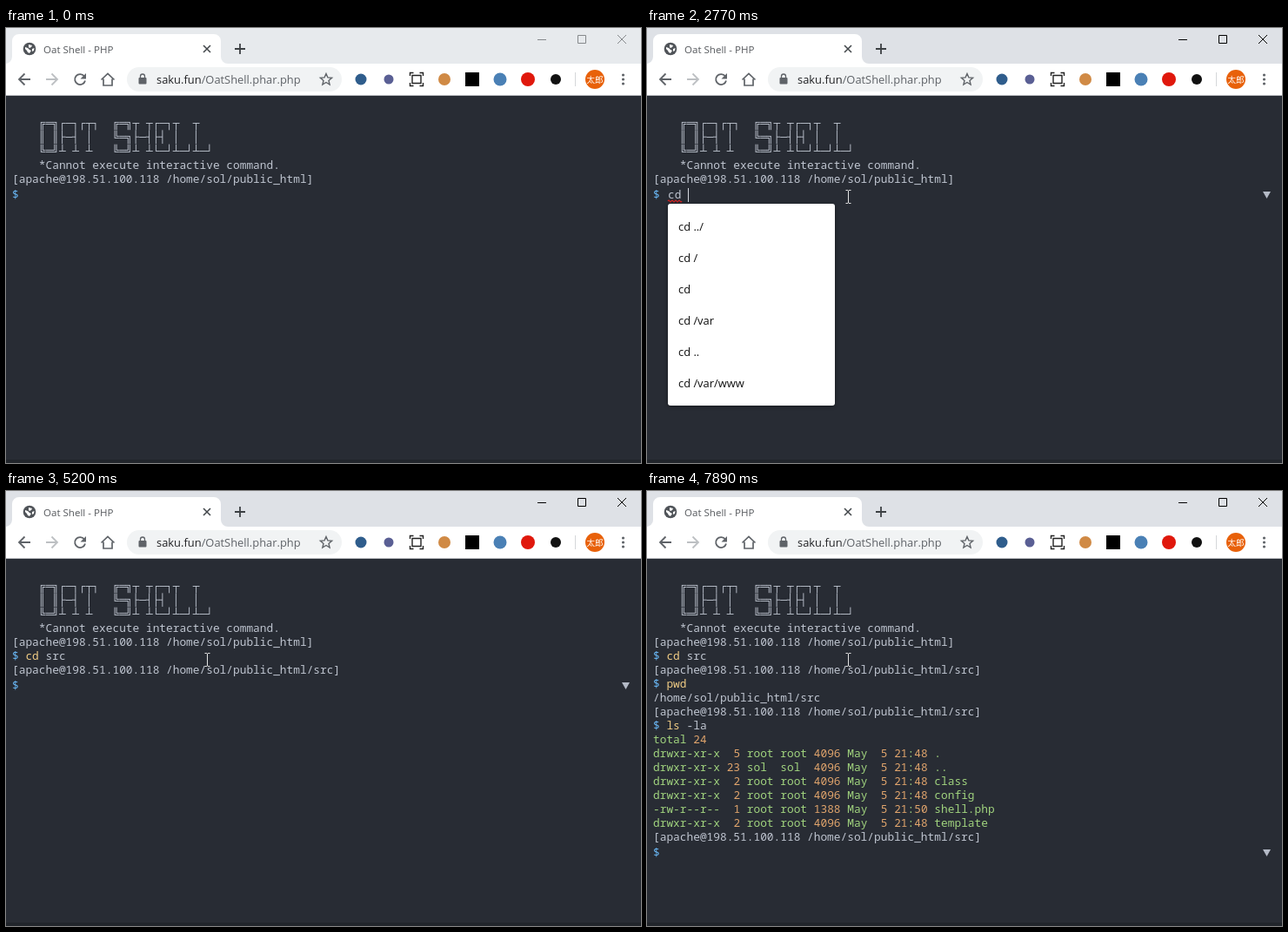
Animation, 730 px wide and 500 px high, one loop 8000 ms. Source, as an HTML page:

```html
<!DOCTYPE html>
<html lang="en">
<head>
<meta charset="utf-8">
<title>Oat Shell - PHP</title>
<style>
html, body { margin: 0; width: 100%; height: 100%; overflow: hidden; background: #282c34; }
svg { display: block; }
text { white-space: pre; }
.mono { font: 500 12.83px "Noto Sans Mono", "DejaVu Sans Mono", monospace; fill: #bfc5d0; }
.ui { font-family: "Open Sans", "Noto Sans", sans-serif; }
.item { font-size: 12.9px; fill: #111; }
.sub { font-size: 11.6px; fill: #757575; }
.line { fill: none; stroke: #5f6368; stroke-width: 1.8; }
.menu { filter: drop-shadow(0 1px 2px rgba(0, 0, 0, .4)); }
</style>
</head>
<body>
<svg width="730" height="500" viewBox="0 0 730 500">
  <defs><clipPath id="menuClip"><rect x="36" y="78" width="432" height="422"/></clipPath></defs>

  <rect id="strip" width="730" height="42"/>
  <path d="M-1 41a8 8 0 0 0 8-8V15a8 8 0 0 1 8-8H239a8 8 0 0 1 8 8V33a8 8 0 0 0 8 8Z" fill="#fff"/>
  <g id="favicon">
    <circle cx="27" cy="24" r="7.3" fill="#505459"/>
    <path d="M22 22l3 1 2 2 2 1-2 3-2-1-1-2-2-2ZM26 19l4 1-1 2-2 1-1-1ZM30 24l2.500-1-.5 3-2 1Z" fill="#fff"/>
  </g>
  <path id="spinner" d="M27 17.5a6.5 6.5 0 0 1 5.6 9.8" fill="none" stroke="#4285f4" stroke-width="2"/>
  <text class="ui" x="43" y="28.5" font-size="11.55" fill="#55585c">Oat Shell - PHP</text>
  <path d="M227 20l8 8m0-8l-8 8" class="line" style="stroke:#45494d;stroke-width:1.6"/>
  <path d="M263 24h12m-6-6v12" class="line" style="stroke:#3c4043"/>
  <path id="controls" d="M611 13.5h10M657.5 8.5h9v9h-9ZM703 8l10 10m0-10l-10 10" fill="none"/>

  <rect y="41" width="730" height="36" fill="#fff"/>
  <rect y="77" width="730" height="1" fill="#b8babf"/>
  <path d="M28 59H15m6.5-6.5L15 59l6.5 6.5" class="line"/>
  <path d="M46 59H59m-6.5-6.5L59 59l-6.5 6.5" class="line" style="stroke:#bdc0c3"/>
  <g id="reload">
    <path d="M90 55.5a6 6 0 1 0 1 5" class="line"/>
    <path d="M92 52v6.5h-6.5Z" fill="#5f6368"/>
  </g>
  <path id="stop" d="M80 54l10 10m0-10L80 64" class="line"/>
  <path d="M109.5 59.5L117 52.5l7.5 7M112 58.5V66h10V58.5" class="line" style="stroke-width:1.7"/>
  <rect x="139" y="45" width="247" height="28" rx="14" fill="#f1f3f4"/>
  <rect x="152.5" y="57" width="9" height="7.5" rx="1" fill="#5f6368"/>
  <path d="M154.5 57v-1.5a2.5 2.5 0 0 1 5 0V57" class="line" style="stroke-width:1.3"/>
  <text class="ui" x="173" y="64" font-size="12.9" fill="#5f6368"><tspan fill="#202124">saku.fun</tspan>/OatShell.phar.php</text>
  <path d="M368 52.5l1.9 4.4 4.7.4-3.6 3.1 1.1 4.6-4.1-2.5-4.1 2.5 1.1-4.6-3.6-3.1 4.7-.4Z" class="line" style="stroke-width:1.4"/>

  <circle cx="408" cy="59" r="6.5" fill="#2f5d8c"/>
  <circle cx="440" cy="59" r="5.5" fill="#5a5f94"/>
  <path d="M467 54.5h10v9h-10ZM464.5 55v-3.5h4M475.5 51.5h4V55M464.5 63v3.5h4M475.5 66.5h4V63" class="line" style="stroke:#222;stroke-width:1.4"/>
  <circle cx="504" cy="59" r="7" fill="#d08a45"/>
  <rect x="528" y="51" width="16" height="16" fill="#000"/>
  <circle cx="568" cy="59" r="7.5" fill="#4a80b5"/>
  <circle cx="600" cy="59" r="8" fill="#e0180c"/>
  <circle cx="632" cy="59" r="6" fill="#111"/>
  <path d="M654.5 51v16" stroke="#d5d7da"/>
  <circle cx="677" cy="59" r="11" fill="#e8610a"/>
  <text x="677" y="62.5" font-size="9.5" text-anchor="middle" fill="#fff" style="font-family:'Noto Sans CJK JP','Noto Sans CJK',sans-serif">太郎</text>
  <g fill="#5f6368"><circle cx="709.5" cy="54" r="1.6"/><circle cx="709.5" cy="59" r="1.6"/><circle cx="709.5" cy="64" r="1.6"/></g>

  <rect y="78" width="730" height="422" fill="#282c34"/>
  <rect y="496" width="730" height="4" fill="#21252b"/>
  <g id="terminal"></g>
  <g id="status" class="ui">
    <path d="M0 478H237a4 4 0 0 1 4 4V500H0Z" fill="#dee1e6"/>
    <text x="6" y="493" font-size="11.6" fill="#5f6368">Waiting for saku.fun...</text>
  </g>
  <path id="beam" d="M-3 -7.5h2.3l.7.7.7-.7H3M-3 7.5h2.3l.7-.7.7.7H3M0 -7V7" fill="none" stroke="#e4e4e4"/>
  <path id="arrow" d="M.5 .5V16.5l3.7-3.5 2.5 5.5 2.3-1-2.4-5.5H11.5Z" fill="#fff" stroke="#111" stroke-width=".9"/>
</svg>
<script>
const LOOP = 8000;
const COLUMN = 7.698;
const $ = id => document.getElementById(id);

const path = '/home/sol/public_html';
const promptLine = dir => `[apache@198.51.100.118 ${dir}]`;
const banner = [
  '    ╔═╗┌─┐┌┬┐  ╔═╗┬ ┬┌─┐┬  ┬',
  '    ║ ║├─┤ │   ╚═╗├─┤├┤ │  │',
  '    ╚═╝┴ ┴ ┴   ╚═╝┴ ┴└─┘┴─┘┴─┘',
  '    *Cannot execute interactive command.',
  promptLine(path)
];
const afterCd = [...banner, '$ cd src', promptLine(path + '/src')];
const afterPwd = [...afterCd, '$ pwd', path + '/src', promptLine(path + '/src')];
const entry = (links, owner, name) =>
  `drwxr-xr-x ${links} ${owner} ${owner} 4096 May  5 21:48 ${name}`;
const afterLs = [
  ...afterPwd, '$ ls -la', 'total 24',
  entry(' 5', 'root', '.'),
  entry('23', 'sol ', '..'),
  entry(' 2', 'root', 'class'),
  entry(' 2', 'root', 'config'),
  '-rw-r--r--  1 root root 1388 May  5 21:50 shell.php',
  entry(' 2', 'root', 'template'),
  promptLine(path + '/src')
];

const wide = (...items) => ({ dump: true, items });
const narrow = (...items) => ({ items });
const pwdMenu = narrow('pwd', 'pwd | ls -la', 'pwd; ls -la');

// Each step overrides part of the state from its time onwards.
const steps = [
  [0, { page: banner, typed: '', caret: false, menu: null, hover: false, active: false, loading: false, pointer: 'none' }],
  [130, { pointer: 'arrow' }],
  [830, { pointer: 'beam', hover: true }],
  [1230, { active: true }],
  [1300, { caret: true, menu: wide('ls -la', 'ls', 'pwd', 'cd ../', 'clear', 'cd /') }],
  [1780, { caret: false }],
  [2240, { typed: 'c', caret: true, menu: wide('cd ../', 'clear', 'cd /', 'cd', 'cd /var', 'cd ..') }],
  [2540, { typed: 'cd' }],
  [2620, { menu: narrow('cd ../', 'cd /', 'cd', 'cd /var', 'cd ..', 'cd /var/www') }],
  [2770, { typed: 'cd ' }],
  [2850, { menu: narrow('cd ../', 'cd /', 'cd /var', 'cd ..', 'cd /var/www', 'cd /home') }],
  [3320, { caret: false }],
  [3570, { typed: 'cd s', caret: true }],
  [3640, { menu: null }],
  [3790, { typed: 'cd sr' }],
  [3960, { typed: 'cd src' }],
  [4270, { loading: true }],
  [4460, { caret: false }],
  [4650, { page: afterCd, typed: '', caret: true }],
  [4730, { loading: false }],
  [5200, { caret: false }],
  [5730, { typed: 'p', caret: true, menu: wide('pwd', 'pwd | ls -la', 'pwd; ls -la', 'php -v', 'ps aux') }],
  [5810, { typed: 'pw', menu: pwdMenu }],
  [5890, { typed: 'pwd' }],
  [6040, { menu: null, loading: true }],
  [6270, { page: afterPwd, typed: '', pointer: 'arrow' }],
  [6350, { loading: false }],
  [6730, { typed: 'l' }],
  [6810, { pointer: 'beam', menu: narrow('ls -la', 'ls', 'ls ../') }],
  [6980, { typed: 'ls' }],
  [7050, { typed: 'ls ', menu: narrow('ls -la', 'ls ../') }],
  [7120, { typed: 'ls -', menu: narrow('ls -la') }],
  [7280, { typed: 'ls -l' }],
  [7360, { typed: 'ls -la', menu: null }],
  [7510, { page: afterLs, typed: '' }],
  [7890, { caret: false }]
];

const stateAt = t => Object.assign({}, ...steps.filter(([time]) => time <= t).map(([, s]) => s));
const text = (x, y, cls, body) => `<text x="${x}" y="${y}" class="${cls}">${body}</text>`;
const tint = (color, body) => `<tspan fill="${color}">${body}</tspan>`;
const show = (id, on) => { $(id).style.display = on ? '' : 'none'; };

const BLUE = '#6abaf8', YELLOW = '#efcb84', GREEN = '#a0d37e', ORANGE = '#e0a46c';

function colorize(line) {
  if (line.startsWith('$')) {
    const [, command, rest] = line.match(/^\$ (\S+)(.*)/);
    return tint(BLUE, '$ ') + tint(YELLOW, command) + rest;
  }
  if (/^(total|[d-]rw)/.test(line))
    return tint(GREEN, line.replace(/\d+/g, n => tint(ORANGE, n)));
  return line;
}

function drawMenu({ dump, items }, top) {
  const head = dump ? 66 : 0;
  const width = dump ? 456 : 192;
  let out = `<rect class="menu" x="24" y="${top}" width="${width}" height="${head + 16 + 36 * items.length}" rx="3" fill="#fff"/>`;
  if (dump) {
    out += `<g clip-path="url(#menuClip)">${text(36, top + 31, 'ui item',
      'mysqldump --single-transaction --events --skip-lock-tables -u {USER} -p{PASSWORD}')}</g>`;
    out += text(36, top + 53, 'ui sub', 'MySQL - Dump');
    out += `<path d="M24 ${top + 74.5}h${width}" stroke="#dcdcdc"/>`;
  }
  return out + items.map((item, i) => text(36, top + head + 31 + 36 * i, 'ui item', item)).join('');
}

function drawTerminal(s) {
  const base = 114 + 16 * (s.page.length - 1) + 18;
  let out = s.page.map((line, i) => text(7, 114 + 16 * i, 'mono', colorize(line))).join('');
  out += text(7, base, 'mono', tint(BLUE, '$')) + text(24, base, 'mono', s.typed);
  const word = s.typed.match(/^\w+(?= )/);
  if (word) {
    const waves = 'q1 -2 2 0t2 0'.repeat(Math.round(word[0].length * COLUMN / 4));
    out += `<path d="M24 ${base + 3}${waves}" fill="none" stroke="#e02020" stroke-width="1.1"/>`;
  }
  if (s.caret)
    out += `<rect x="${Math.floor(24 + s.typed.length * COLUMN)}" y="${base - 12}" width="1" height="16" fill="#d5d8de"/>`;
  if (s.hover) out += `<path d="M708 ${base - 8}h9l-4.5 8Z" fill="#b4bac6"/>`;
  if (s.menu) out += drawMenu(s.menu, base + 6);
  return out;
}

function pointerAt(t) {
  if (t >= 1060) return [229.5, 193];
  if (t >= 830) return [229.5, 198 - 5 * Math.floor((t - 830) / 76) / 3];
  const p = Math.min(1, Math.floor((t - 130) / 78) / 7);
  const e = 1 - (1 - p) ** 2;
  return [572 - 342.5 * e, 454 - 253 * e];
}

let lastTerminal = '';
function render(t) {
  const s = stateAt(t);
  const terminal = drawTerminal(s);
  if (terminal !== lastTerminal) $('terminal').innerHTML = lastTerminal = terminal;

  $('strip').setAttribute('fill', s.active ? '#dee1e6' : '#e7eaed');
  $('controls').setAttribute('stroke', s.active ? '#000' : '#85888b');
  show('favicon', !s.loading);
  show('reload', !s.loading);
  show('spinner', s.loading);
  show('stop', s.loading);
  $('spinner').setAttribute('transform', `rotate(${Math.floor(t / 77) * 40 % 360} 27 24)`);

  show('status', t >= 4420 && t < 5200);
  $('status').setAttribute('opacity', t < 5040 ? 1 : t < 5120 ? 0.65 : 0.3);

  const [x, y] = pointerAt(t);
  show('arrow', s.pointer === 'arrow');
  show('beam', s.pointer === 'beam');
  $('arrow').setAttribute('transform', `translate(${x} ${y})`);
  $('beam').setAttribute('transform', `translate(${x + 2} ${y + 1})`);
}

const start = performance.now();
function tick() {
  render((performance.now() - start) % LOOP);
  requestAnimationFrame(tick);
}
tick();
</script>
</body>
</html>
```
